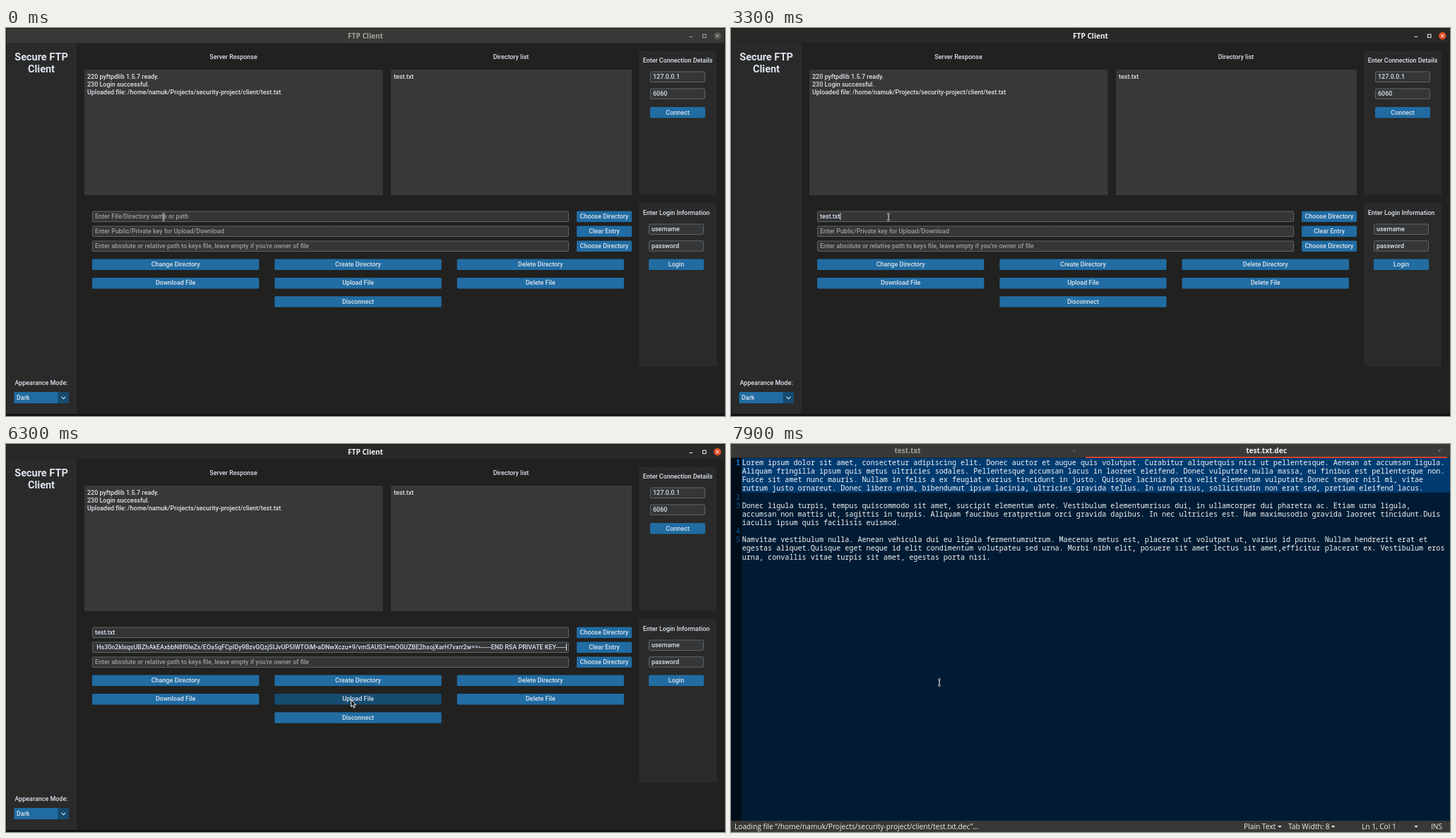
These frames come from a looping animation (1018 by 550 pixels, 8 s). An HTML page with a canvas:

```html
<!DOCTYPE html>
<html lang="en">
<head>
<meta charset="utf-8">
<title>FTP Client</title>
<style>
html, body { margin: 0; width: 100%; height: 100%; overflow: hidden; background: #212121; }
canvas { display: block; }
</style>
</head>
<body>
<canvas id="stage" width="1018" height="550"></canvas>
<script>
const c = document.getElementById('stage').getContext('2d');
const UI = '500 8.95px Roboto, sans-serif';
const HEAD = '700 14.5px Roboto, sans-serif';
const BAR = '10.2px "Open Sans", sans-serif';
const BAR_BOLD = '700 10.1px "Open Sans", sans-serif';
const CODE = '10.12px "Noto Sans Mono", monospace';
const LIGHT = '#dce4ee', BLUE = '#216ca2', DEEP = '#164b70', PANEL = '#2a2a2a', DIM = '#9e9e9e';

const KEY = 'Hs30n2klxqsUBZhAkEAxbbN8f0IeZx/EOa5qFCpIDy9BzvGQzjSIJvUP5IWTOiM•aDNwXczu+9/vmSAUS3+' +
  'mOGUZBE2hsojXarH7vxrr2w==•-----END RSA PRIVATE KEY-----';
const LOG = ['220 pyftpdlib 1.5.7 ready.', '230 Login successful.',
  'Uploaded file: /home/namuk/Projects/security-project/client/test.txt',
  'Downloaded and decrypted file: test.txt'];
const LINES = [
  'Lorem ipsum dolor sit amet, consectetur adipiscing elit. Donec auctor et augue quis volutpat. Curabitur aliquetquis nisi ut pellentesque. Aenean at accumsan ligula.',
  'Aliquam fringilla ipsum quis metus ultricies sodales. Pellentesque accumsan lacus in laoreet eleifend. Donec vulputate nulla massa, eu finibus est pellentesque non.',
  'Fusce sit amet nunc mauris. Nullam in felis a ex feugiat varius tincidunt in justo. Quisque lacinia porta velit elementum vulputate.Donec tempor nisl mi, vitae',
  'rutrum justo ornareut. Donec libero enim, bibendumut ipsum lacinia, ultricies gravida tellus. In urna risus, sollicitudin non erat sed, pretium eleifend lacus.',
  '',
  'Donec ligula turpis, tempus quiscommodo sit amet, suscipit elementum ante. Vestibulum elementumrisus dui, in ullamcorper dui pharetra ac. Etiam urna ligula,',
  'accumsan non mattis ut, sagittis in turpis. Aliquam faucibus eratpretium orci gravida dapibus. In nec ultricies est. Nam maximusodio gravida laoreet tincidunt.Duis',
  'iaculis ipsum quis facilisis euismod.',
  '',
  'Namvitae vestibulum nulla. Aenean vehicula dui eu ligula fermentumrutrum. Maecenas metus est, placerat ut volutpat ut, varius id purus. Nullam hendrerit erat et',
  'egestas aliquet.Quisque eget neque id elit condimentum volutpateu sed urna. Morbi nibh elit, posuere sit amet lectus sit amet,efficitur placerat ex. Vestibulum eros',
  'urna, convallis vitae turpis sit amet, egestas porta nisi.'];
const LINE_ROWS = [0, 4, 5, 8, 9];
const KEY_TIMES = [1000, 1100, 1400, 1600, 2100, 3100, 3200, 3300];

// Pointer path: time, x, y
const PATH = [
  [3900, 223, 268], [4000, 224, 272], [4200, 226, 285], [4400, 226, 285], [4700, 211, 293],
  [5200, 211, 293], [5600, 222, 308], [5700, 222, 308], [6200, 480, 366], [6300, 488.5, 362.5],
  [6400, 420, 367], [6500, 330, 368], [6600, 290, 366], [6700, 290, 366], [6900, 280, 363.5],
  [7300, 280, 363.5], [7400, 281.5, 363], [7800, 281.5, 363], [7900, 295, 338]];

function pointer(t) {
  const i = PATH.findIndex(p => p[0] >= t);
  if (i < 0) return PATH[PATH.length - 1].slice(1);
  const b = PATH[i], a = PATH[Math.max(0, i - 1)];
  const k = b === a ? 0 : (t - a[0]) / (b[0] - a[0]);
  return [a[1] + (b[1] - a[1]) * k, a[2] + (b[2] - a[2]) * k];
}

function rect(x, y, w, h, color) {
  c.fillStyle = color;
  c.fillRect(x, y, w, h);
}
function rounded(x, y, w, h, color, border) {
  c.beginPath();
  c.roundRect(x, y, w, h, 1.5);
  c.fillStyle = color;
  c.fill();
  if (border) {
    c.strokeStyle = border;
    c.lineWidth = 1;
    c.stroke();
  }
}
function text(s, x, y, color = LIGHT, align = 'left', font = UI) {
  c.font = font;
  c.fillStyle = color;
  c.textAlign = align;
  c.fillText(s, x, y);
}
function lines(color, width, ...strokes) {
  c.strokeStyle = color;
  c.lineWidth = width;
  c.beginPath();
  for (const [x, y, ...rest] of strokes) {
    c.moveTo(x, y);
    for (let i = 0; i < rest.length; i += 2) c.lineTo(rest[i], rest[i + 1]);
  }
  c.stroke();
}
function cross(x, y, r, color) {
  lines(color, 1, [x - r, y - r, x + r, y + r], [x - r, y + r, x + r, y - r]);
}
function entry(x, cy, w, s, color) {
  rounded(x + .5, cy - 7, w - 1, 14.5, '#343638', '#606467');
  text(s, x + 4, cy + 3, color);
}
function button(x, cy, w, s, hover) {
  rounded(x, cy - 7.5, w, 15.5, hover ? DEEP : BLUE);
  text(s, x + w / 2, cy + 3, LIGHT, 'center');
}

function iBeam(x, y) {
  const shape = [[x, y - 4.5, x, y + 4.5], [x - 2, y - 4.5, x + 2, y - 4.5], [x - 2, y + 4.5, x + 2, y + 4.5]];
  lines('#d0d0d0', 2, ...shape);
  lines('#303030', .7, ...shape);
}
function arrow(x, y) {
  c.beginPath();
  [[0, 0], [0, 10], [2.3, 8], [4, 11.5], [5.6, 10.8], [4.1, 7.4], [7.2, 7.2]]
    .forEach(([dx, dy]) => c.lineTo(x + dx, y + dy));
  c.closePath();
  c.fillStyle = '#202020';
  c.fill();
  c.strokeStyle = '#f0f0f0';
  c.lineWidth = 1;
  c.stroke();
}

function titleBar(active) {
  const ink = active ? '#f4f4f2' : '#a5a4a0';
  rect(0, 0, 1018, 22, '#1d1d1c');
  rect(1, 1, 1016, 20.5, active ? '#292827' : '#393836');
  text('FTP Client', 509, 15, ink, 'center', BAR_BOLD);
  lines(ink, 1, [967.5, 12.5, 972, 12.5]);
  c.strokeRect(986.5, 9, 4.5, 4.5);
  c.beginPath();
  c.arc(1007.3, 11, 5.2, 0, 7);
  c.fillStyle = active ? '#e2522a' : '#545350';
  c.fill();
  cross(1007.3, 11, 2, active ? '#fff' : '#c4c3c0');
}

function client(t) {
  const [mx, my] = pointer(t);
  rect(0, 0, 1018, 550, '#212120');
  titleBar(t >= 400);
  rect(1, 22, 99, 525, PANEL);
  rect(0, 22, 1, 528, '#171717');
  rect(0, 547, 1018, 3, '#111114');
  rounded(896, 33, 110, 204, PANEL);
  rounded(896, 248, 110, 232, PANEL);

  text('Secure FTP', 50, 46, LIGHT, 'center', HEAD);
  text('Client', 50, 63, LIGHT, 'center', HEAD);
  text('Appearance Mode:', 50, 506.3, LIGHT, 'center');
  rounded(11, 516, 78, 16, DEEP);
  rect(12, 516, 61.5, 16, BLUE);
  text('Dark', 15, 527.3);
  lines(LIGHT, 1.1, [78.5, 522.7, 81.5, 525.7, 84.5, 522.7]);

  text('Server Response', 322, 44, LIGHT, 'center');
  text('Directory list', 715, 44, LIGHT, 'center');
  rounded(111, 59, 422.5, 178, '#393837');
  rounded(545, 59, 341, 178, '#393837');
  LOG.slice(0, t < 7300 ? 3 : 4).forEach((s, i) => text(s, 115, 72.3 + i * 11));
  text('test.txt', 549, 72.3);

  text('Enter Connection Details', 951, 49, LIGHT, 'center');
  entry(912, 69, 78, '127.0.0.1');
  entry(912, 93, 78, '6060');
  button(912, 119.5, 78, 'Connect');
  text('Enter Login Information', 949, 265, LIGHT, 'center');
  entry(910, 285, 78, 'username');
  entry(910, 308.7, 78, 'password');
  button(910, 335, 78, 'Login');

  const typed = 'test.txt'.slice(0, KEY_TIMES.filter(k => k <= t).length);
  if (t < 400) entry(122, 267, 675, 'Enter File/Directory name or path', DIM);
  else entry(122, 267, 675, typed);
  entry(122, 288, 675, t < 4600 ? 'Enter Public/Private key for Upload/Download' : '', DIM);
  entry(122, 309, 675, "Enter absolute or relative path to keys file, leave empty if you're owner of file", DIM);
  if (t >= 5100) {
    c.save();
    c.beginPath();
    c.rect(125, 281, 669, 14);
    c.clip();
    text(KEY, 793, 291, LIGHT, 'right');
    c.restore();
  }

  // Text caret: 600 ms on, 300 ms off
  if (t >= 400 && t < 4600 && (t - 400) % 900 < 600) {
    c.font = UI;
    rect(126 + c.measureText(typed).width, 262, 1, 10, LIGHT);
  } else if (t >= 4600 && (t < 4900 || t >= 5300 && (t - 5300) % 900 < 600)) {
    rect(t < 5100 ? 126 : 793, 283, 1, 10, LIGHT);
  }

  button(808, 267, 78, 'Choose Directory');
  button(808, 288, 78, 'Clear Entry');
  button(808, 309, 78, 'Choose Directory');
  [['Change Directory', 'Create Directory', 'Delete Directory'],
   ['Download File', 'Upload File', 'Delete File'],
   ['', 'Disconnect']].forEach((row, r) => row.forEach((s, i) => {
    const x = 122 + i * 258.3, y = 335 + r * 26.4;
    const hover = t < 7300 && Math.abs(my - y) < 8 && mx > x && mx < x + 236;
    if (s) button(x, y, 236.3, s, hover);
  }));

  const inEntry = [267, 288, 309].some(y => Math.abs(my - y) < 8);
  (inEntry ? iBeam : arrow)(mx, my);
}

function triangle(x) {
  c.beginPath();
  c.moveTo(x - 2.7, 541);
  c.lineTo(x + 2.7, 541);
  c.lineTo(x, 544);
  c.fill();
}

function editor(t) {
  rect(0, 0, 1018, 550, '#001b33');
  rect(15, 20, 1003, 48.7, '#003b70');
  rect(0, 20, 15, 514, '#000d19');
  rect(0, 0, 1018, 19.5, '#3a3937');
  rect(502, 18, 512, 2, '#d0432f');
  text('test.txt', 250, 13, '#a09f9b', 'center', BAR_BOLD);
  text('test.txt.dec', 758, 13, '#f2f2ef', 'center', BAR_BOLD);
  cross(486, 9.5, 1.8, '#62615e');
  cross(1003, 9.5, 1.8, '#858480');

  LINES.forEach((s, i) => text(s, 15.7, 30 + i * 12.14, '#f4f6f8', 'left', CODE));
  LINE_ROWS.forEach((row, i) =>
    text(i + 1, 13, 30 + row * 12.14, i ? '#0759a0' : '#1479d0', 'right', (i ? '' : '700 ') + CODE));
  if (t < 7700) rect(16, 20, 1, 12, '#fff');

  rect(0, 534, 1018, 16, '#393836');
  const ink = '#eeeeea';
  const status = (s, x) => text(s, x, 546, ink, 'left', BAR);
  status('Loading file “/home/namuk/Projects/security-project/client/test.txt.dec”…', 5);
  status('Plain Text', 726);
  status('Tab Width: 8', 789);
  status('Ln 1, Col 1', 893);
  status('INS', 991);
  [777, 852.5, 970].forEach(triangle);
  iBeam(...pointer(t));
}

function draw(now) {
  const t = Math.floor(now % 8000 / 100) * 100;
  (t < 7400 ? client : editor)(t);
  requestAnimationFrame(draw);
}
requestAnimationFrame(draw);
</script>
</body>
</html>
```
